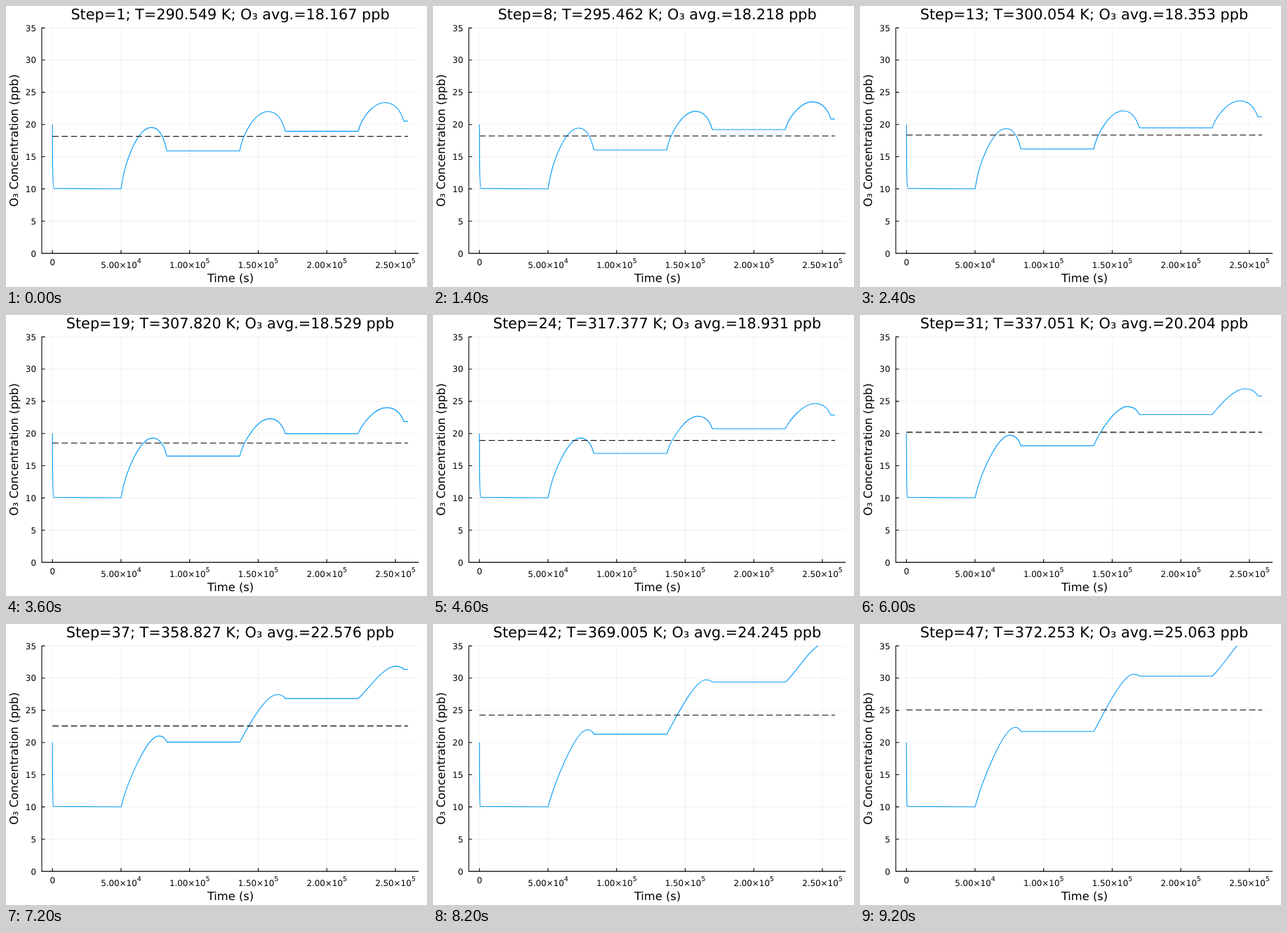
Animation, 600 px wide and 400 px high, one loop 9400 ms. Source, as an HTML page:

```html
<!DOCTYPE html>
<html lang="en">
<head>
<meta charset="utf-8">
<title>Ozone concentration</title>
<style>
  html, body { margin: 0; width: 100%; height: 100%; overflow: hidden; background: #fff; }
  svg { display: block; font-family: "DejaVu Sans", sans-serif; text-rendering: geometricPrecision; }
  text { text-anchor: middle; }
  path { fill: none; stroke: #000; stroke-width: 1.1; }
  #grid { stroke-width: 1; stroke-opacity: .06; }
  #curve { stroke: #009af9; stroke-linejoin: round; }
  #mean { stroke-dasharray: 8.8 4.4; }
  #labels { font-size: 11.9px; }
  .axis { font-size: 16.3px; }
  #title { font-size: 20.8px; }
</style>
</head>
<body>
<svg width="600" height="400" viewBox="0 0 600 400">
  <clipPath id="plot"><rect x="51" y="31" width="537" height="321"/></clipPath>
  <path id="grid"/>
  <path id="axes"/>
  <g id="labels"></g>
  <g clip-path="url(#plot)"><path id="curve"/><path id="mean"/></g>
  <text id="title" x="319.5" y="18.5"></text>
  <text class="axis" x="320" y="393">Time (s)</text>
  <text class="axis" transform="translate(17 191.5) rotate(-90)">O₃ Concentration (ppb)</text>
</svg>
<script>
const STEP_MS = 200, STEPS = 47;
const DAY = 86400, SUNRISE = 50100, SUNSET = 83400, END = 3 * DAY;
const $ = id => document.getElementById(id);
const X = seconds => 66.2 + seconds * 0.001955;
const Y = ppb => 352.1 - ppb * 9.17;
const mix = (a, b, p) => a + (b - a) * p;

// Key points of the optimisation: step, temperature, mean ppb
const keys = [
  [1, 290.549, 18.167], [8, 295.462, 18.218], [13, 300.054, 18.353], [24, 317.377, 18.931],
  [31, 337.051, 20.204], [37, 358.827, 22.576], [47, 372.253, 25.063]
];

// Smooth curve through the key points, levelling off at the last one
function sample(col, step) {
  const last = keys.length - 1;
  let i = 0;
  while (i < last - 1 && step > keys[i + 1][0]) i++;
  const gap = k => keys[k + 1][0] - keys[k][0];
  const slope = k => (keys[k + 1][col] - keys[k][col]) / gap(k);
  const tangent = k => k === 0 ? slope(0) : k === last ? 0
    : (slope(k - 1) * gap(k) + slope(k) * gap(k - 1)) / (gap(k - 1) + gap(k));
  const h = gap(i), t = (step - keys[i][0]) / h, u = 1 - t;
  return u * u * (1 + 2 * t) * keys[i][col] + t * t * (3 - 2 * t) * keys[i + 1][col]
    + t * u * h * (u * tangent(i) - t * tangent(i + 1));
}

// Each day rises to a peak, then falls back to its night level
function curvePath(temp) {
  const p = (temp - 290.549) / 81.704;
  const firstGain = 5.88 + 2.38 * p + 1.48 * p ** 2 + 1.96 * p ** 3;
  const decay = .518 + .037 * (firstGain - 5.88);
  let night = 10.02;
  let d = `M66.2 ${Y(20)}L66.4 215Q66.7 259 ${mix(68.6, 67.3, p)} ${Y(10.08)}L${X(SUNRISE)} ${Y(night)}`;
  for (let day = 0; day < 3; day++) {
    const x0 = X(SUNRISE + day * DAY), x1 = X(SUNSET + day * DAY), y0 = Y(night);
    night += firstGain * decay ** day;
    const overshoot = (2.8 + .84 * .32 ** day) * (1 - (1.3 - .15 * .5 ** day) * p + .32 * p * p);
    const fall = 22.1 + 2.5 * day - (8.5 + day) * p - (5.2 + 1.9 * day) * p * p;
    const end = Y(night), top = Y(night + overshoot), xp = x1 - fall, w = xp - x0;
    const ax = mix(.11, .14 + .06 * day, p), ay = mix(.46, .27 - .04 * day, p), bx = mix(.56, .69, p);
    d += `C${x0 + ax * w} ${mix(y0, top, ay)} ${x0 + bx * w} ${top} ${xp} ${top}`
      + `C${xp + .45 * fall} ${top} ${xp + .8 * fall} ${mix(top, end, .36)} ${x1} ${end}`
      + `H${X(Math.min(SUNRISE + (day + 1) * DAY, END))}`;
  }
  return d;
}

function drawAxes() {
  let grid = "", axes = `M51 31V${Y(0)}H588`, labels = "";
  for (let v = 0; v <= 35; v += 5) {
    grid += `M51 ${Y(v)}H588`;
    axes += `M51 ${Y(v)}h4.5`;
    labels += `<text x="43" y="${Y(v) + 4.4}" style="text-anchor:end">${v}</text>`;
  }
  for (let s = 0; s <= 250000; s += 50000) {
    const x = X(s), [base, power] = s.toExponential(2).split("e+");
    grid += `M${x} 31V${Y(0)}`;
    axes += `M${x} ${Y(0)}v-4.5`;
    labels += s ? `<text x="${x}" y="372.5">${base}×10<tspan dy="-6.3" font-size="9.5">${power}</tspan></text>`
      : `<text x="${x}" y="368.5">0</text>`;
  }
  $("grid").setAttribute("d", grid);
  $("axes").setAttribute("d", axes);
  $("labels").innerHTML = labels;
}

let shown = 0;
function render(now) {
  const step = Math.floor(now / STEP_MS) % STEPS + 1;
  if (step !== shown) {
    shown = step;
    const temp = sample(1, step), mean = sample(2, step);
    $("curve").setAttribute("d", curvePath(temp));
    $("mean").setAttribute("d", `M${X(0)} ${Y(mean)}H${X(END)}`);
    $("title").textContent = `Step=${step}; T=${temp.toFixed(3)} K; O₃ avg.=${mean.toFixed(3)} ppb`;
  }
  requestAnimationFrame(() => render(performance.now() - start));
}

drawAxes();
const start = performance.now();
render(0);
</script>
</body>
</html>
```
